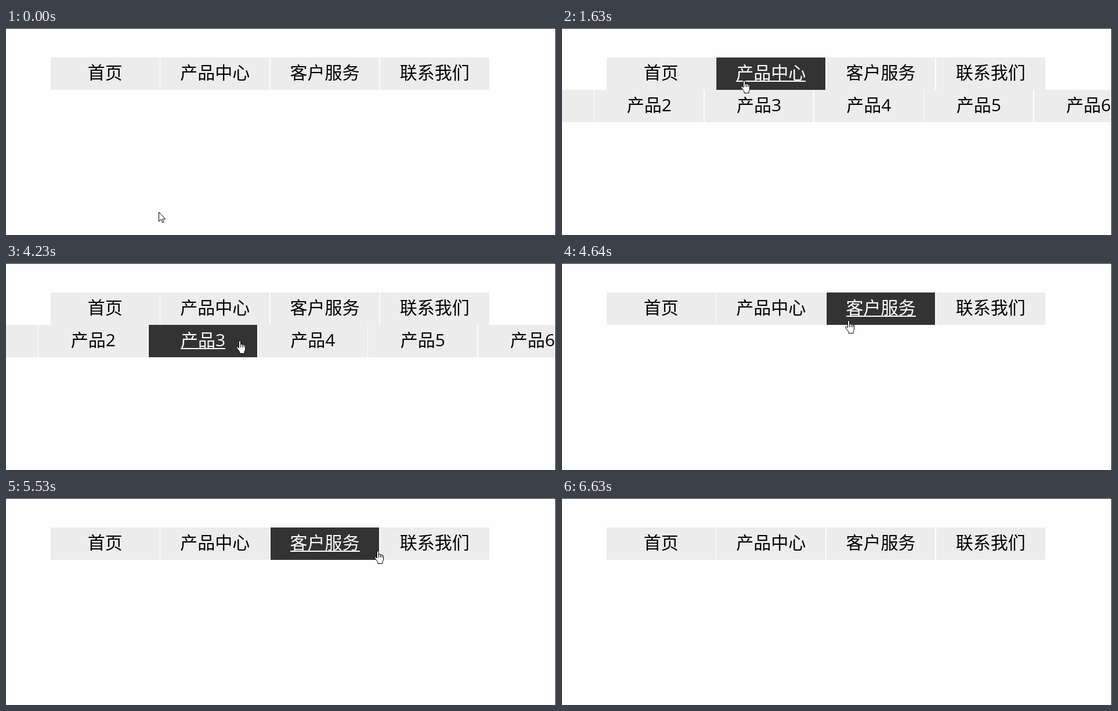
These frames come from a looping animation (948 by 358 pixels, 7730 ms). An HTML page:

```html
<!DOCTYPE html>
<html lang="zh-CN">
<head>
<meta charset="utf-8">
<title>导航菜单</title>
<style>
  html, body { margin: 0; width: 100%; height: 100%; overflow: hidden; background: #fefefe; }
  svg { display: block; width: 100%; height: 100%; }
  text { font: 30px "Open Sans", "Noto Sans CJK SC", "Noto Sans CJK", sans-serif; text-anchor: middle; }
  rect { shape-rendering: crispEdges; }
  .item .box { fill: #ececec; }
  .item .line { fill: none; }
  .item.hover .box { fill: #333; }
  .item.hover text, .item.hover .line { fill: #fff; }
  #cursor path { fill: #fff; stroke: #000; stroke-linejoin: round; }
</style>
</head>
<body>
<svg id="stage" viewBox="0 0 948 358">
  <g id="menu"></g>
  <g id="submenu"></g>
  <rect width="948" height="1"/>
  <rect x="947" width="1" height="358"/>
  <g id="cursor">
    <path id="arrow" d="M.5.5V16.5L4.2 13L6.8 18.8L9.2 17.8L6.7 12.2H11.7Z"/>
    <g id="hand" transform="translate(-5 -1)">
      <path d="M4.5 13V2Q4.5.5 6 .5T7.5 2V7.5Q7.5 6 9 6T10.4 7.5V8Q10.5 6.8 11.8 6.8T13.2 8.2V9Q13.4 8 14.4 8T15.5 9.5V15Q15.5 17.5 14 19.5V22.5H6V20Q4 17.5 1 13.2Q0 11.5 1.2 10.8Q2.5 10.3 4.5 13Z"/>
      <path d="M7.5 7V12M10.4 8V12M13.2 9V12"/>
    </g>
  </g>
</svg>
<script>
const LOOP = 7730, PITCH = 189.333, WIDTH = 187.7, HEIGHT = 56;
const $ = id => document.getElementById(id);

function add(parent, tag, attrs, text = '') {
  const el = document.createElementNS('http://www.w3.org/2000/svg', tag);
  for (const key in attrs) el.setAttribute(key, attrs[key]);
  el.textContent = text;
  return parent.appendChild(el);
}

function buildRow(parent, labels, left, top) {
  return labels.map((label, i) => {
    const x = left + i * PITCH, center = x + WIDTH / 2;
    const digits = label.replace(/\D/g, '').length;
    const textWidth = (label.length - digits) * 30 + digits * 17.2;
    const el = add(parent, 'g', { class: 'item' });
    add(el, 'rect', { class: 'box', x, y: top, width: WIDTH, height: HEIGHT });
    add(el, 'text', { x: center, y: top + 37 }, label);
    add(el, 'rect', { class: 'line', x: center - textWidth / 2, y: top + 40, width: textWidth, height: 2 });
    return { el, x, top };
  });
}

const menu = buildRow($('menu'), ['首页', '产品中心', '客户服务', '联系我们'], 77, 51);
const submenu = buildRow($('submenu'), [1, 2, 3, 4, 5, 6].map(n => '产品' + n), -132.9, 107);

// Each move: first change, last change, step count, then [step, x, y] waypoints.
const start = [263, 318];
const moves = [
  [40, 770, 18, [3, 270, 296], [6, 277, 246], [10, 256, 172], [14, 222, 110], [18, 208, 92]],
  [890, 890, 1, [1, 206, 91]],
  [1300, 1630, 8, [2, 222, 91], [5, 282, 91], [8, 313, 91]],
  [2520, 2730, 6, [2, 312, 102], [6, 306, 136]],
  [2930, 3210, 8, [5, 255, 133], [8, 218, 133]],
  [3820, 4350, 12, [4, 265, 135], [9, 402, 135], [12, 470, 135]],
  [4600, 4720, 4, [1, 482, 105], [4, 515, 91]],
  [5000, 5210, 6, [1, 545, 91], [4, 693, 93], [6, 712, 92]],
  [5370, 6140, 19, [4, 640, 92], [10, 420, 91], [17, 268, 91], [19, 240, 78]],
  [6180, 6180, 1, [1, 234, 77]],
  [6470, 6630, 5, [1, 305, 140], [4, 597, 331], [5, 700, 400]]
];

function cursorAt(t) {
  let pos = start;
  for (const [from, to, steps, ...points] of moves) {
    if (t < from) break;
    const step = to > from
      ? Math.min(steps, Math.floor((t - from) / (to - from) * (steps - 1) + 1e-6) + 1)
      : steps;
    let prev = [0, ...pos];
    for (const next of points) {
      const f = Math.min(1, (step - prev[0]) / (next[0] - prev[0]));
      pos = [1, 2].map(i => Math.round(prev[i] + (next[i] - prev[i]) * f));
      if (step <= next[0]) break;
      prev = next;
    }
  }
  return pos;
}

function render(t) {
  const [x, y] = cursorAt(t);
  const over = item => x >= item.x - 0.5 && x < item.x + WIDTH && y >= item.top && y < item.top + HEIGHT;
  const open = over(menu[1]) || (t > 1300 && t < 6400 && y >= 107 && y < 163);
  let pointing = false;
  for (const item of open ? [...menu, ...submenu] : menu) {
    const hover = over(item);
    item.el.classList.toggle('hover', hover);
    pointing = pointing || hover;
  }
  $('submenu').style.display = open ? '' : 'none';
  $('hand').style.display = pointing ? '' : 'none';
  $('arrow').style.display = pointing ? 'none' : '';
  $('cursor').style.display = t < 6630 ? '' : 'none';
  $('cursor').setAttribute('transform', `translate(${x} ${y})`);
}

const began = performance.now();
function tick() {
  render((performance.now() - began) % LOOP);
  requestAnimationFrame(tick);
}
tick();
</script>
</body>
</html>
```
